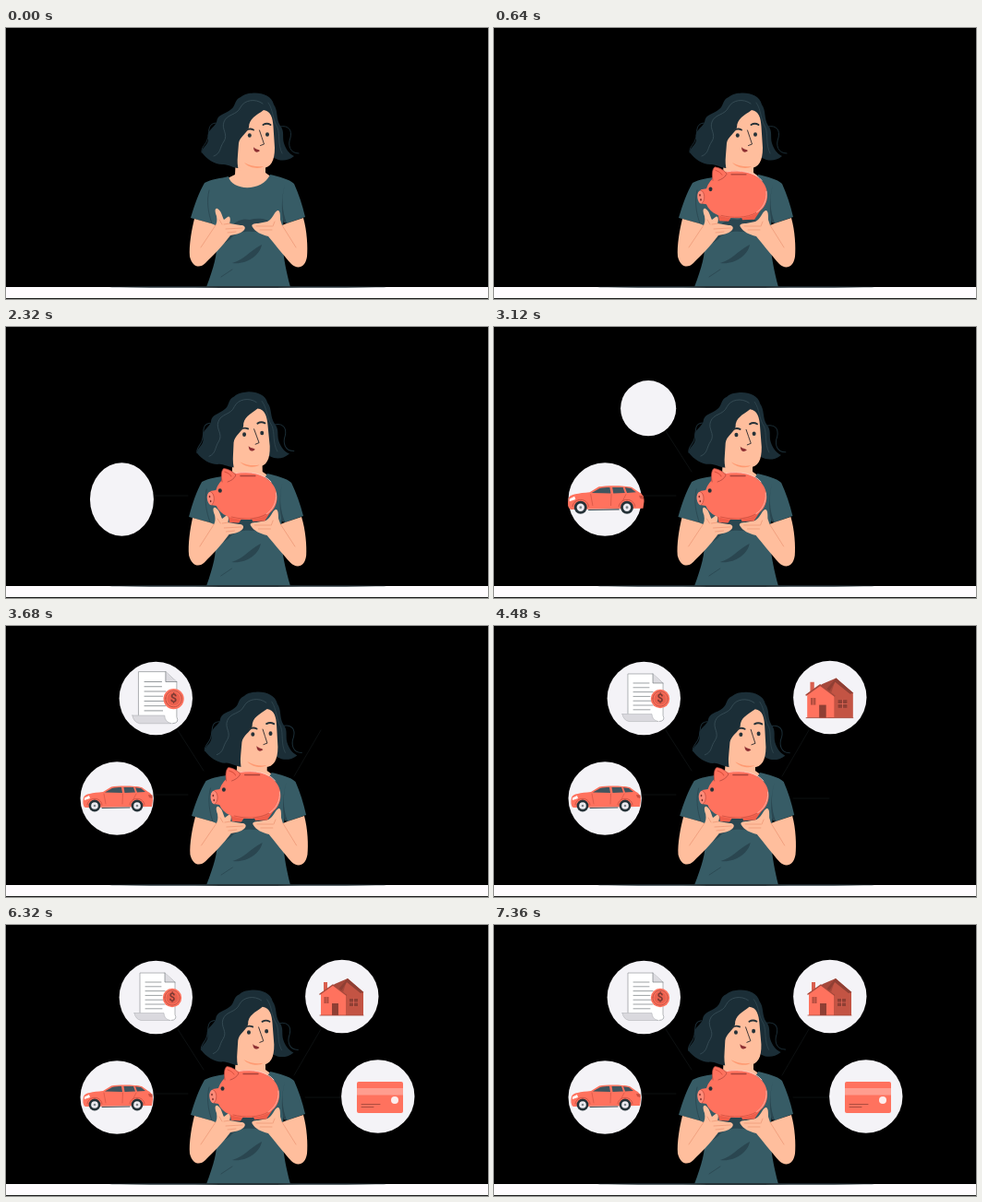
Animation, 522 px wide and 294 px high, one loop 7.52 s. Source, as an HTML page with a canvas:

```html
<!DOCTYPE html>
<html lang="en">
<head>
<meta charset="utf-8">
<title>Savings goals</title>
<style>
html, body { margin: 0; width: 100%; height: 100%; overflow: hidden; background: #000; }
canvas { display: block; width: 522px; height: 294px; }
</style>
</head>
<body>
<canvas id="stage"></canvas>
<script>
const W = 522, H = 294, LOOP = 7520, STEP = 80;
const canvas = document.getElementById('stage');
const ctx = canvas.getContext('2d');
const dpr = window.devicePixelRatio || 1;
canvas.width = W * dpr;
canvas.height = H * dpr;

const CORAL = '#ff725e', DARK = '#263238', SKIN = '#ffbe9d', SHIRT = '#375c66',
  FOLD = '#2a4650', HAIR = '#1b2e37', STRAND = '#3f565f', BUBBLE = '#f4f3f7';

const clamp = v => Math.max(0, Math.min(1, v));
const easeOut = u => 1 - Math.pow(1 - clamp(u), 3);
const smooth = u => { u = clamp(u); return u * u * (3 - 2 * u); };

// Eased value between [time, value] keys
function key(t, keys) {
  let prev = keys[0];
  for (const k of keys) {
    if (t < k[0]) return prev[1] + (k[1] - prev[1]) * smooth((t - prev[0]) / (k[0] - prev[0] || 1));
    prev = k;
  }
  return prev[1];
}

function fill(d, color) {
  ctx.fillStyle = color;
  ctx.fill(new Path2D(d));
}
function line(d, color, width = 0.7) {
  ctx.strokeStyle = color;
  ctx.lineWidth = width;
  ctx.stroke(new Path2D(d));
}
function oval(x, y, rx, ry, color, turn = 0) {
  ctx.fillStyle = color;
  ctx.beginPath();
  ctx.ellipse(x, y, rx, ry, turn, 0, 7);
  ctx.fill();
}
function box(x, y, w, h, color) {
  ctx.fillStyle = color;
  ctx.fillRect(x, y, w, h);
}
function group(draw) {
  ctx.save();
  draw();
  ctx.restore();
}
function scaleAt(x, y, sx, sy = sx) {
  ctx.translate(x, y);
  ctx.scale(sx, sy);
  ctx.translate(-x, -y);
}

function car() {
  fill('M84 186C85 182 94 181 105 180L114 174.500C121 173 140 173 147 175L154 180C158 182 159 185 159 189L158 196L86 197Q82 195 84 186Z', CORAL);
  fill('M107 180.500L115 176C118 175 122 175 125 175L126 181Z', '#40555e');
  fill('M127.500 175L138 175L140 180.500L128.500 181Z', '#40555e');
  fill('M140 175.200L146 176L151 180L142 180.500Z', '#40555e');
  line('M104 197.500L134 197', '#3c4a50', 1);
  line('M88 194C89 185 103 185 104 194M134 194C135 185 149 185 150 194', '#c94f40', 0.8);
  fill('M85 186.500L90 184L91 187L85 189Z', '#fff');
  fill('M154 183L158.500 183.500L158.500 187L155 186Z', '#c94f40');
  line('M106 182L108 193M126.500 182L126 193M141 182L138 188', '#c94f40', 0.6);
  for (const x of [96, 142]) {
    oval(x, 195, 6.4, 6.4, DARK);
    oval(x, 195, 3.8, 3.8, '#eceaf0');
    oval(x, 195, 1.3, 1.3, '#7d858a');
  }
}

function bill() {
  fill('M145 52L172 52L183 62L183 96Q186 102 179 103.500L146 98Z', '#fff');
  line('M145 95L145 52L172 52L183 62L183 97Q186 103 179 103.500', '#83888b', 0.6);
  fill('M172 52L172 62L183 62Z', '#dcdbe0');
  line('M172 52L172 62L183 62', '#6b7175', 0.6);
  fill('M139 95.500L171 95.500Q171 102 178 103.500L146 103.500Q140 102 139 95.500Z', '#dad9de');
  line('M139 95.500L171 95.500Q171 102 178 103.500L146 103.500Q140 102 139 95.500Z', '#a9abae', 0.5);
  for (let i = 0; i < 7; i++) {
    const w = i < 2 ? 17 : i % 3 ? 21 : 18;
    line(`M151 ${62 + i * 4.8}h${w}`, '#73797d', 0.7);
  }
  oval(180, 79, 10.2, 10.2, CORAL);
  ctx.setLineDash([1.2, 0.9]);
  line('M172 79a8 8 0 1 0 16 0a8 8 0 1 0 -16 0', '#a8483b', 0.8);
  ctx.setLineDash([]);
  oval(180, 79, 6.6, 6.6, '#e9604e');
  ctx.fillStyle = '#7c3a33';
  ctx.font = '700 12px Roboto, Arial, sans-serif';
  ctx.textAlign = 'center';
  ctx.textBaseline = 'middle';
  ctx.fillText('$', 180, 79.5);
}

function house() {
  box(344, 62, 4, 13, '#d95f4e');
  fill('M352 72L370 58L387 73L387 98L362 98Z', '#c35444');
  fill('M345 73L356 64L370 58L364 76Z', '#a5483b');
  fill('M370 58L387.500 73L384 74L369 62L362 73L358 72Z', '#8f3f34');
  fill('M341 74L354 65L368 75L368 98L341 98Z', CORAL);
  line('M340 75L354 65L368.500 76', '#a5483b', 1.5);
  box(353, 85, 7, 13, '#8f3f34');
  box(344.5, 78, 5, 7, '#b24d3f');
  box(372, 80, 9, 8, '#8f3f34');
  line('M376.500 80v8M372 84h9M347 78v7', '#e8695a', 0.7);
  line('M340 98h47', '#a5483b', 0.8);
}

function card() {
  ctx.fillStyle = CORAL;
  ctx.beginPath();
  ctx.roundRect(380, 170, 50, 34, 2);
  ctx.fill();
  box(380, 177, 50, 7.5, '#ff9d8f');
  oval(421, 190, 4, 4, '#fdeeee');
  line('M385 194.500h20M385 197.500h13', '#a5483b', 0.9);
}

// dx, dy: point of the disc that stays put while it opens
const bubbles = [
  { x: 120.2, y: 187, dx: 40, dy: 0, flat: true, at: 2025, draw: car, from: [197, 183], to: [160, 183] },
  { x: 162.3, y: 78.5, dx: 20, dy: 40, at: 2894, draw: bill, from: [214, 157], to: [186, 113] },
  { x: 363.8, y: 77.5, dx: -20, dy: 40, at: 3714, draw: house, from: [312, 163], to: [341, 113] },
  { x: 402.8, y: 186, dx: -40, dy: 0, flat: true, at: 4576, draw: card, from: [324, 187], to: [363, 187] }
];
const PEAK = 1.11;

function bubble(b, t) {
  const grow = easeOut((t - b.at + 420) / 380);
  if (grow <= 0) return;
  const [x0, y0] = b.from, [x1, y1] = b.to;
  line(`M${x0} ${y0}L${x0 + (x1 - x0) * grow} ${y0 + (y1 - y0) * grow}`, '#161b1e', 0.6);
  const dt = t - b.at;
  const open = easeOut(dt / 600);
  if (open <= 0) return;
  group(() => {
    scaleAt(b.x + b.dx, b.y + b.dy, open, b.flat ? easeOut(dt / 280) : open);
    oval(b.x, b.y, 39.7, 39.7, BUBBLE);
  });
  if (dt <= 460) return;
  const s = dt < 900 ? PEAK * easeOut((dt - 460) / 440)
    : PEAK + (1 - PEAK) * smooth((dt - 900) / 750);
  group(() => {
    scaleAt(b.x, b.y, s);
    b.draw();
  });
}

function torso() {
  fill('M249 140L281 140L281 157L288 162L278 178L250 178L240 163L248 159Z', SKIN);
  fill('M241 161C244 177 278 178 286 159C295 161 307 164 312 169C317 180 321 192 324 205L304 212L301 206C298 230 299 246 308 281L217 281C225 260 229 245 228 233L222 212L200 206C204 192 209 178 215 168C222 164 233 163 241 161Z', SHIRT);
  fill('M236 234C239 214 252 205 264 208C280 204 297 210 301 232L293 229C280 220 252 216 243 229Z', FOLD);
  fill('M245 255C259 251 262 243 277 235C275 247 260 257 245 255Z', FOLD);
  fill('M302 170C298 185 299 198 304 212L301 211C298 201 298 184 302 170Z', FOLD);
  line('M220 176C217 188 219 201 223 212M233 270L245 262', FOLD, 0.8);
}

function arms() {
  fill('M204 207C201 219 198 236 199 248C202 260 210 261 216 255C224 247 235 236 243 225C250 224 256 222 258 219C260 216 258 214 254 214L242 212C244 207 242 203 240 205L236 208C234 204 233 198 229 196C226 195 226 199 228 204C229 209 228 212 227 214L222 212Z', SKIN);
  fill('M322 206C326 220 327 238 326 248C324 261 315 262 309 256C300 246 290 233 284 226C276 224 270 221 267 216C265 213 268 212 273 212L283 210C289 207 290 200 294 198C297 197 297 203 297 208L299 214L304 212Z', SKIN);
  line('M238 218L256 217M236 213L243 212M240 222L249 221M231 208L234 213', '#e88d6c', 0.6);
  line('M271 215L288 215M275 219L288 219M291 210L289 215M227 214L211 238M299 214L314 238', '#e88d6c', 0.6);
}

function head(t) {
  group(() => {
    const dx = key(t, [[880, 0], [1440, -0.8], [1760, -0.8], [2320, -4.6], [2600, -4.6], [3680, 3.2], [4900, 3.2], [5280, 3.8], [5700, 3.6], [6320, -0.4], [6960, -1.1]]);
    const dy = key(t, [[2600, 0], [3680, 1], [4900, 1.3], [5280, 2.3], [5700, 2.2], [6320, 0]]);
    const tilt = key(t, [[880, 0], [1440, -0.9], [1760, -0.9], [2320, -1.8], [2600, -1.8], [3680, 0.5], [4900, 0.6], [5280, 1.3], [5700, 1.2], [6320, -0.7], [6960, -1.2]]);
    ctx.translate(266 + dx, 152 + dy);
    ctx.rotate(tilt * Math.PI / 180);
    ctx.translate(-266, -152);

    fill('M268 70.500C278 70 288 74 290 83C295 90 292 98 297 106C302 112 299 118 301 125C303 131 306 136 312 139C306 144 300 144 295 143L288 140L255 152C247 153 240 147 234 148C226 148 217 142 212 135C212 129 220 127 219 119C217 111 225 109 228 102C229 93 237 94 244 88C249 84 247 78 254 75C259 71 263 71 268 70.500Z', HAIR);
    line('M297 107C306 105 310 111 308 119C305 127 307 136 317 136', HAIR, 1);
    line('M227 103C217 104 221 114 218 121C217 126 211 129 212 135', HAIR, 1);
    fill('M279 89C287 90 289 98 289.500 107L291 130C291 144 287 152 277 152L252 155Q250 148 251 138L252 125C253 118 261 114 263 108C263 98 271 95 279 89Z', SKIN);
    fill('M258 146C265 150 272 151 279 150C276 153 264 153 258 146Z', '#ff9a72');
    line('M278 82C270 76 258 78 254 86C250 95 239 93 236 102C233 110 241 115 236 123C231 130 233 136 225 139', STRAND, 0.7);
    line('M284 81C290 90 288 98 294 108C297 116 294 126 299 136', STRAND, 0.5);

    line('M260 111C263 109 265 109 268 110.500M278.500 105C281 103.500 284 103.500 286.500 105', DARK, 1.9);
    const lid = key(t, [[7040, 1], [7200, 0.12], [7280, 0.12], [7360, 1]]);
    oval(263.8, 116.5, 2, 2.3 * lid, DARK);
    oval(283, 115.5, 2, 2.3 * lid, DARK);
    line('M274.500 111C276 116 278 121 279.500 126L275.500 127.500', '#2b2a2d', 0.9);
    fill('M268 129C270 132 273 131 275 133C272 136 268 135 268 129Z', '#8c2f32');
  });
}

function pig(t) {
  if (t < STEP) return;
  group(() => {
    ctx.translate(0, key(t, [[80, 4], [400, -7.5], [800, 0]]));
    scaleAt(258, 212, easeOut(t / 420));
    fill('M242 202L244 212L254 212.500L259 205ZM267 205L269 211L282 210.500L289 200Z', '#ef5d4a');
    fill('M224 178L230 177C234 165 245 157.500 261 157.500C282 157.500 296 169 296 184C296 200 282 209 262 209C246 209 234 204 230 194L224 193Z', CORAL);
    oval(224, 186, 3.7, 7.2, '#ff8a78', -0.08);
    line('M224 178.500C229 180 229 191 225 193', '#b8483b', 0.7);
    oval(223, 184, 0.8, 1.3, '#7c2f2a');
    oval(224, 189, 0.8, 1.3, '#7c2f2a');
    fill('M237 170C236 163 236 156 239 153.500C244 154 250 157 252 161C249 167 243 168 237 170Z', CORAL);
    line('M237 168C236 162 236 156 239 153.500C244 154 250 157 252 161C250 165 246 167 243 168', '#a9423a', 0.7);
    line('M240 157C243 158 246 160 247 162', '#d9503f', 1);
    oval(234.5, 177.5, 2, 2.3, DARK);
    line('M257 161.500L273 161.500', '#a9423a', 1.3);
    line('M252 158.500C267 156 283 159 290 168', '#ffc9c0', 0.9);
    line('M295 180C296 190 291 199 283 203.500', '#ffb5a9', 0.9);
    line('M246 206C258 209 274 209 284 203', '#d95645', 1);
  });
}

function render(t) {
  ctx.setTransform(dpr, 0, 0, dpr, 0, 0);
  ctx.lineCap = ctx.lineJoin = 'round';
  box(0, 0, W, H, '#000');
  for (const b of bubbles) bubble(b, t);

  // The upper body leans from the table edge
  const sway = key(t, [[1700, 0], [2300, -3], [2600, -3], [3700, 1.6], [4080, 1.8], [5700, 1.8], [6320, 0]]);
  const lean = -sway / 116;
  const leaning = draw => group(() => {
    ctx.transform(1, 0, lean, 1, -lean * 281, 0);
    draw();
  });
  leaning(torso);
  head(t);
  leaning(() => {
    arms();
    pig(t);
  });

  box(0, 281, W, 12, '#fffcff');
  box(0, 293, W, 1, '#1c1c1c');
  oval(262, 281, 150, 0.9, DARK);
}

const start = performance.now();
function tick() {
  const t = (performance.now() - start) % LOOP;
  render(Math.floor(t / STEP) * STEP);
  requestAnimationFrame(tick);
}
tick();
</script>
</body>
</html>
```
